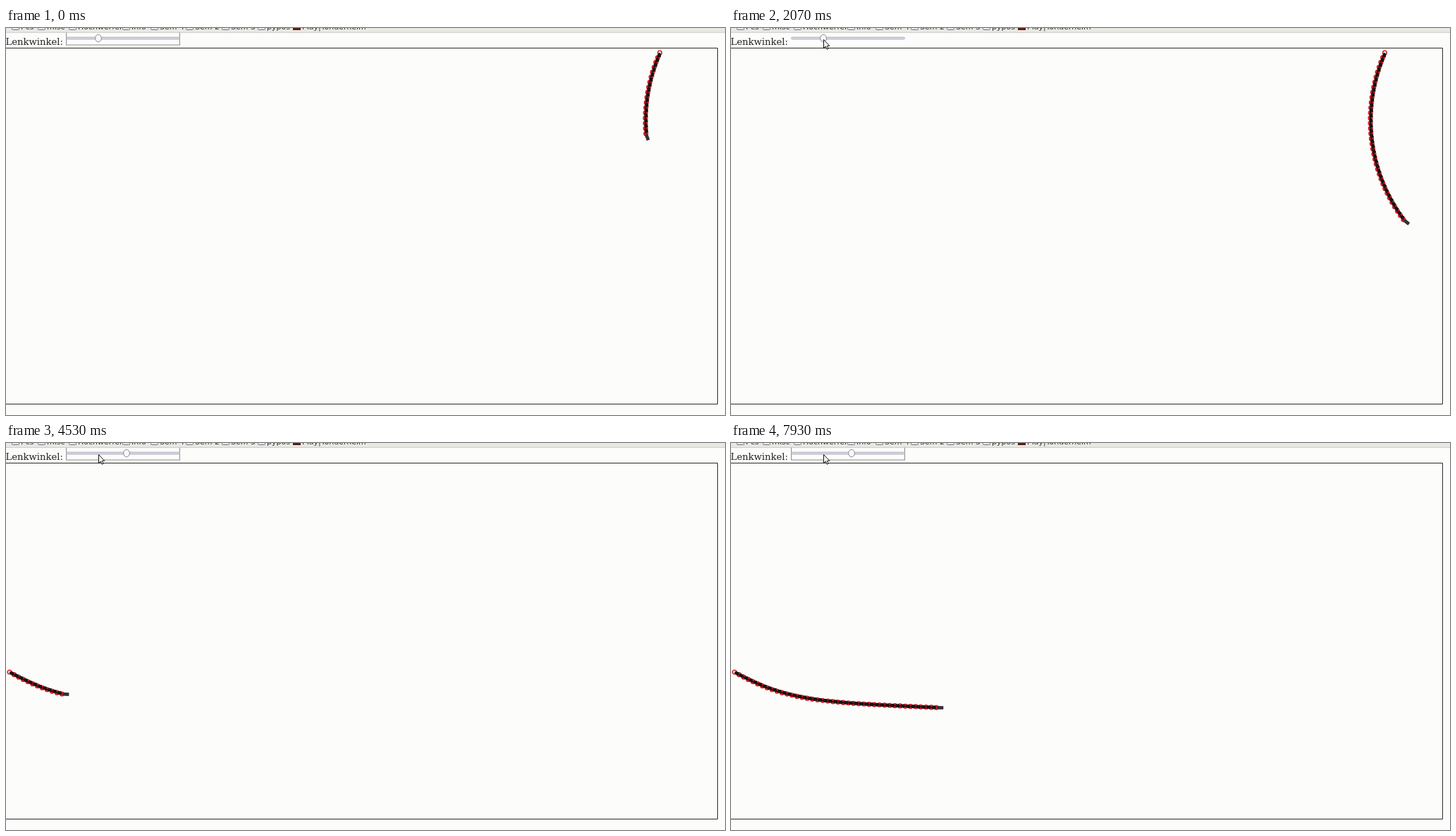
An HTML page that plays this animation: 1020 px wide and 549 px high, repeating every 8 s.

```html
<!DOCTYPE html>
<html lang="de">
<head>
<meta charset="utf-8">
<title>Lenkwinkel</title>
<style>
html, body { margin: 0; width: 100%; height: 100%; overflow: hidden; background: #fcfcfb; }
svg { display: block; }
.bar { font: 11px "DejaVu Sans", sans-serif; fill: #333; }
.label { font: 13.2px "DejaVu Serif", serif; fill: #222; }
</style>
</head>
<body>
<svg id="stage" width="1020" height="549" viewBox="0 0 1020 549">
  <rect width="1020" height="549" fill="#fcfcfb"/>
  <path d="M-2 28.5H1009.5V533.5H-2" fill="none" stroke="#2a2a2a"/>
  <text class="label" x="-0.5" y="24">Lenkwinkel:</text>
  <rect id="focus" x="85.5" y="3.5" width="161" height="20.5" fill="none" stroke="#8c8c8c"/>
  <rect x="85.5" y="13" width="161" height="3" rx="1.5" fill="#d5d5e0" stroke="#a9a9b6" stroke-width=".8"/>
  <ellipse id="knob" cy="14.5" rx="4.3" ry="5.3" fill="#f8f8f8" stroke="#8a8a8a"/>
  <rect width="1020" height="6" fill="#e9e9e4"/>
  <path d="M0 6.3H1020" stroke="#c9c9c4"/>
  <g id="bar" class="bar"></g>
  <g id="trail"></g>
  <path id="mouse" d="M0 0V12L2.7 9.5L4.6 13.7L6.5 12.9L4.7 8.8H8.3Z" fill="#fff" stroke="#111"/>
</svg>
<script>
const LOOP = 8000, TICK = 117, STEP = 7.35, WRAP = 3242;
const RAD = Math.PI / 180;
const $ = id => document.getElementById(id);

const marks = [
  [8, "Pcs"], [45, "misc"], [89, "Hochwerfer"], [165, "Info"], [205, "Sem 4"],
  [255, "Sem 2"], [306, "Sem 3"], [357, "pypos"], [407, "Play|Tonderhelm"]
];
$("bar").innerHTML = marks.map(([x, name], i) => {
  const last = i === marks.length - 1;
  const icon = last
    ? `<rect x="${x}" y="-8" width="11" height="11" fill="#5a1c10"/>`
    : `<rect x="${x + .5}" y="-6" width="10" height="8.5" rx="1" fill="#e4e4ea" stroke="#77777f"/>`;
  return `${icon}<text x="${x + 13}" y="2">${name}</text>`;
}).join("");

// Each path gives points {x, y, a: heading, turn: wheel angle}, in degrees.
function arcPath(n) {
  const R = 235, pts = [];
  for (let i = 0; i <= n; i++) {
    const q = -24.1 + i * STEP / R / RAD;
    pts.push({
      x: 907 + R * (1 - Math.cos(q * RAD)),
      y: 131 + R * Math.sin(q * RAD),
      a: 90 - q, turn: -15
    });
  }
  return pts;
}

function easingPath(n) {
  const pts = [];
  let x = 5, y = 325;
  const heading = s => 2.5 + 26.5 * Math.exp(-Math.pow(s / 93, 1.65));
  for (let i = 0; i <= n; i++) {
    const s = i * STEP, a = heading(s);
    pts.push({ x, y, a, turn: (heading(s + 1) - a) * 61.5 });
    const mid = heading(s + STEP / 2) * RAD;
    x += STEP * Math.cos(mid);
    y += STEP * Math.sin(mid);
  }
  return pts;
}

function bead(p, i) {
  return `<circle cx="${p.x.toFixed(2)}" cy="${p.y.toFixed(2)}" r="2.8" ` +
    `fill="${i ? "#c81e1e" : "#fff"}" stroke="#d8202a" stroke-width="1.6"/>`;
}

function block(p, i, all) {
  const front = i === all.length - 1;
  const pose = `translate(${p.x.toFixed(2)} ${p.y.toFixed(2)}) rotate(${(p.a + p.turn).toFixed(2)})`;
  return `<rect transform="${pose}" x="1.4" y="-2.4" width="${front ? 8.6 : 4.8}" height="4.8" ` +
    `fill="${front ? "#333" : "#161212"}"/>`;
}

function drawTrail(t) {
  const pts = t < WRAP
    ? arcPath(Math.min(44, 16 + Math.floor((t + 103) / TICK)))
    : easingPath(Math.floor((t - WRAP) / TICK));
  const spine = pts.map(p => p.x.toFixed(2) + "," + p.y.toFixed(2)).join(" ");
  $("trail").innerHTML = pts.map(bead).join("") +
    `<polyline points="${spine}" fill="none" stroke="#2a1010" stroke-width="2"/>` +
    pts.map(block).join("");
}

// Mouse stops: time, x, y
const stops = [[270, 880, 4], [530, 864, 40], [820, 846, 58], [1900, 131.5, 16.5]];
function drawMouse(t) {
  const m = $("mouse");
  m.style.display = t < stops[0][0] ? "none" : "";
  let [, x, y] = stops[stops.length - 1];
  for (let i = 1; i < stops.length; i++) {
    const [t0, x0, y0] = stops[i - 1], [t1, x1, y1] = stops[i];
    if (t < t1) {
      const u = Math.max(0, (t - t0) / (t1 - t0)), e = u * u * (3 - 2 * u);
      x = x0 + (x1 - x0) * e;
      y = y0 + (y1 - y0) * e;
      break;
    }
  }
  m.setAttribute("transform", `translate(${x.toFixed(1)} ${y.toFixed(1)})`);
}

function drawSlider(t) {
  const presses = t < 2800 ? 0 : Math.min(7, 1 + Math.floor((t - 2800) / 150));
  $("knob").setAttribute("cx", 131 + 5 * (presses + (t >= 4400 ? 1 : 0)));
  $("focus").style.display = t >= 800 && t < 2350 ? "none" : "";
}

function render(t) {
  drawTrail(t);
  drawSlider(t);
  drawMouse(t);
}

let start;
function frame(now) {
  if (start === undefined) start = now;
  render((now - start) % LOOP);
  requestAnimationFrame(frame);
}
render(0);
requestAnimationFrame(frame);
</script>
</body>
</html>
```
